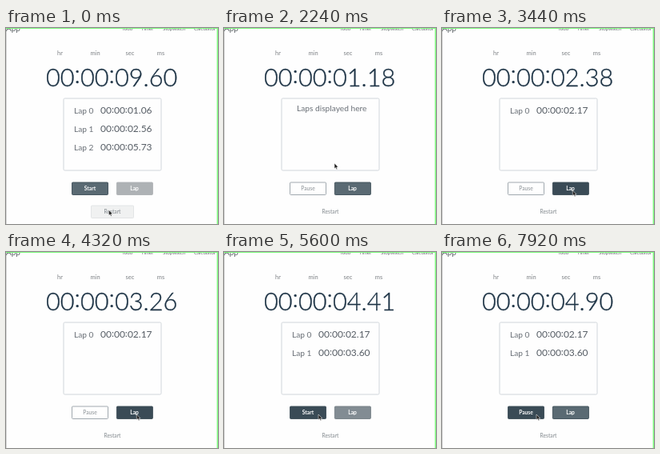
Write an HTML page that moves like this. It is 265 px wide and 245 px high and loops after 8 s.

```html
<!DOCTYPE html>
<html lang="en">
<head>
<meta charset="utf-8">
<title>Stopwatch</title>
<style>
  html, body { margin: 0; height: 100%; overflow: hidden; background: #fefefe; }
  svg { display: block; width: 100vw; height: 100vh; font-family: Lato, "Open Sans", sans-serif; }
  .mid { text-anchor: middle; }
  .nav { font-size: 6.1px; fill: #62676c; }
  .unit { font-size: 7.5px; fill: #7d8185; }
  .button { font-size: 6.7px; }
  .lap { font-size: 10.2px; fill: #6a7077; }
  .lapTime { font-size: 12px; fill: #565d65; }
  #clock { font-size: 30.7px; font-weight: 300; fill: #1d3345; stroke: #1d3345; stroke-width: .35px; }
</style>
</head>
<body>
<svg viewBox="0 0 265 245" preserveAspectRatio="none">
  <path d="M.5 0V245" stroke="#d5d5d5"/>
  <text x="0" y="4" font-size="10" fill="#5a5f64">App</text>
  <g class="nav">
    <text x="145" y="2.8">Todo</text>
    <text x="169" y="2.8">Timer</text>
    <text x="196" y="2.8">Stopwatch</text>
    <text x="235" y="2.8">Calculator</text>
  </g>
  <g fill="#7dfa7d">
    <rect width="265" height="1"/>
    <rect x="263.6" width="1.4" height="245"/>
  </g>
  <g class="unit mid">
    <text x="67.5" y="34">hr</text>
    <text x="111.5" y="34">min</text>
    <text x="155" y="34">sec</text>
    <text x="193.5" y="34">ms</text>
  </g>
  <text id="clock" x="50" y="72.6"></text>
  <rect x="72" y="88" width="122" height="90" rx="1.5" fill="none" stroke="#d0d5db"/>
  <g id="laps"></g>
  <g class="button mid">
    <rect id="toggleBox" x="82.5" y="193" width="45" height="15.5" rx="1" stroke-width=".9"/>
    <text id="toggleText" x="105" y="203.3"></text>
    <rect id="lapBox" x="138.4" y="193" width="45" height="15.5" rx="1" stroke-width=".9"/>
    <text x="160.5" y="203.3" fill="#fff" font-weight="700">Lap</text>
    <rect id="restartBox" x="106.5" y="222" width="53" height="15.5" rx="1" stroke-width=".8"/>
    <text x="133" y="232.3" fill="#80878c">Restart</text>
  </g>
  <path id="cursor" d="M0 0V6.7L1.6 5.4 2.6 7.7 3.7 7.2 2.8 4.9H4.8Z" fill="#222" stroke="#fff" stroke-width=".5"/>
</svg>
<script>
const LOOP = 8000;
const RESET = 300, START = 1060, PAUSE = 5470, RESUME = 7430;
const WHITE = [254, 254, 254], SLATE = [90, 106, 115], DARK = [58, 75, 86], DISABLED = [174, 178, 181];
const EDGE = [62, 78, 89], PALE_EDGE = [150, 159, 166], PALE_TEXT = [137, 143, 148];

// Each key is [time, ...values]
const cursorKeys = [
  [0, 128.5, 227.5], [800, 128.5, 227.5], [1020, 106, 201], [1080, 106, 201], [1280, 135, 154],
  [1600, 136, 156], [2240, 138, 169], [2700, 140, 172], [3100, 163.3, 203],
  [4720, 163.3, 203], [5100, 118, 203], [LOOP, 118, 203]
];
const toggleKeys = [
  [0, ...SLATE], [960, ...SLATE], [1040, ...DARK], [1100, ...DARK], [1250, ...WHITE],
  [4980, ...WHITE], [5120, ...DARK], [LOOP, ...DARK]
];
const toggleKeysBetween = (filled, outlined) => [
  [0, ...filled], [1100, ...filled], [1250, ...outlined],
  [4980, ...outlined], [5120, ...filled], [LOOP, ...filled]
];
const toggleTextKeys = toggleKeysBetween(WHITE, PALE_TEXT);
const toggleEdgeKeys = toggleKeysBetween(EDGE, PALE_EDGE);
const lapKeysBetween = (disabled, idle, hovered) => [
  [0, ...disabled], [START, ...disabled], [1250, ...idle], [2960, ...idle], [3080, ...hovered],
  [4740, ...hovered], [4880, ...idle], [PAUSE, ...idle], [5740, ...disabled],
  [RESUME, ...disabled], [7700, ...idle], [LOOP, ...idle]
];
const lapKeys = lapKeysBetween(DISABLED, SLATE, DARK);
const lapEdgeKeys = lapKeysBetween(DISABLED, EDGE, EDGE);
const restartKeys = [[0, 1], [830, 1], [960, 0], [LOOP, 0]];

const oldLaps = [1060, 2560, 5730];
const newLaps = [{ at: 3230, time: 2170 }, { at: 4660, time: 3600 }];

const byId = id => document.getElementById(id);
const clock = byId("clock"), laps = byId("laps"), cursor = byId("cursor");
const toggleBox = byId("toggleBox"), toggleText = byId("toggleText");
const lapBox = byId("lapBox"), restartBox = byId("restartBox");

function sample(keys, t) {
  const i = keys.findIndex(key => key[0] > t);
  const [t0, ...from] = keys[i - 1], [t1, ...to] = keys[i];
  const u = (t - t0) / (t1 - t0), eased = u * u * (3 - 2 * u);
  return from.map((v, k) => v + (to[k] - v) * eased);
}

const rgb = (keys, t) => `rgb(${sample(keys, t).map(Math.round)})`;
const pad = n => String(n).padStart(2, "0");

function format(ms, lift) {
  const cs = Math.floor(ms / 10 + 1e-6);
  const colon = `<tspan dy="${-lift}">:</tspan>`;
  const pair = n => `<tspan dy="${lift}">${pad(n)}</tspan>`;
  return "00" + colon + pair(Math.floor(cs / 6000)) + colon +
    pair(Math.floor(cs / 100) % 60) + "." + pad(cs % 100);
}

function elapsed(t) {
  if (t < RESET) return 9600;
  if (t < START) return 0;
  if (t < PAUSE) return t - START;
  return PAUSE - START + Math.max(0, t - RESUME);
}

function lapRows(times) {
  if (!times.length) return '<text class="lap" x="91" y="104">Laps displayed here</text>';
  return times.map((time, i) => {
    const y = 106.8 + i * 23;
    return `<text class="lap" x="85" y="${y}">Lap ${i}</text>` +
      `<text class="lapTime" x="118" y="${y}">${format(time, 1)}</text>`;
  }).join("");
}

function setMarkup(node, markup) {
  if (node.markup !== markup) node.innerHTML = node.markup = markup;
}

function draw(now) {
  const t = now % LOOP;
  const running = t >= START && t < PAUSE || t >= RESUME;
  const times = t < RESET ? oldLaps : newLaps.filter(lap => t >= lap.at).map(lap => lap.time);
  setMarkup(clock, format(elapsed(t), 3.5));
  setMarkup(laps, lapRows(times));

  toggleBox.setAttribute("fill", rgb(toggleKeys, t));
  toggleBox.setAttribute("stroke", rgb(toggleEdgeKeys, t));
  toggleText.setAttribute("fill", rgb(toggleTextKeys, t));
  toggleText.setAttribute("font-weight", t > 1170 && t < 5050 ? 400 : 700);
  toggleText.textContent = running ? "Pause" : "Start";
  lapBox.setAttribute("fill", rgb(lapKeys, t));
  lapBox.setAttribute("stroke", rgb(lapEdgeKeys, t));

  const hover = sample(restartKeys, t)[0];
  restartBox.setAttribute("fill", `rgba(240,241,241,${hover})`);
  restartBox.setAttribute("stroke", `rgba(222,224,225,${hover})`);
  cursor.setAttribute("transform", `translate(${sample(cursorKeys, t)})`);
  requestAnimationFrame(draw);
}

draw(0);
</script>
</body>
</html>
```
